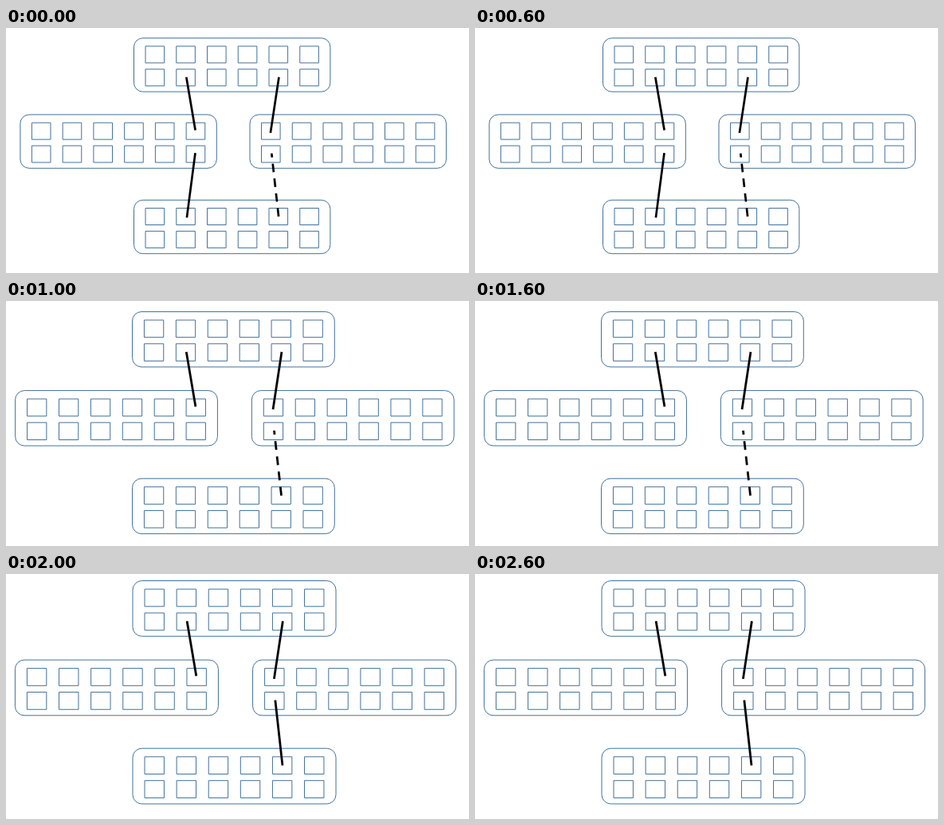
An HTML page with a canvas that plays this animation: 581 by 308 pixels, repeating every 3000 ms.

```html
<!DOCTYPE html>
<html lang="en">
<head>
<meta charset="utf-8">
<title>Linked switches</title>
<style>
html, body { margin: 0; width: 581px; height: 308px; overflow: hidden; background: #fff; }
canvas { display: block; }
</style>
</head>
<body>
<canvas id="stage" width="581" height="308"></canvas>
<script>
const ctx = document.getElementById('stage').getContext('2d');
const STEP = 1000;

// Coordinates are relative to the top panel's corner, at scale 1.
const panels = [[0, 0], [-142.6, 96.2], [145.5, 96.2], [0, 203.6]];
const links = {
  topLeft: [65.8, 49, 77.1, 115.8],
  topRight: [182, 49, 171.4, 119.2],
  bottomLeft: [66.4, 225.6, 77, 144.4],
  bottomRight: [181.6, 224.3, 172.8, 145]
};
const scenes = [
  { x: 160.5, y: 12.7, scale: 1, solid: ['topLeft', 'topRight', 'bottomLeft'], dashed: ['bottomRight'] },
  { x: 158.5, y: 13.5, scale: 1.03, solid: ['topLeft', 'topRight'], dashed: ['bottomRight'] },
  { x: 159, y: 8.5, scale: 1.035, solid: ['topLeft', 'topRight', 'bottomRight'], dashed: [] }
];

function drawPanel([x, y]) {
  ctx.beginPath();
  ctx.roundRect(x, y, 246.4, 67.4, 11.2);
  for (let row = 0; row < 2; row++) {
    for (let col = 0; col < 6; col++) {
      ctx.rect(x + 14.5 + col * 38.75, y + 10.2 + row * 28.9, 23.6, 21);
    }
  }
  ctx.stroke();
}

function drawLink(name, dash) {
  const [x1, y1, x2, y2] = links[name];
  ctx.setLineDash(dash);
  ctx.beginPath();
  ctx.moveTo(x1, y1);
  ctx.lineTo(x2, y2);
  ctx.stroke();
}

function drawScene({ x, y, scale, solid, dashed }) {
  ctx.setTransform(1, 0, 0, 1, 0, 0);
  ctx.fillStyle = '#fff';
  ctx.fillRect(0, 0, 581, 308);
  ctx.setTransform(scale, 0, 0, scale, x, y);
  ctx.setLineDash([]);
  ctx.strokeStyle = '#41719c';
  ctx.lineWidth = 1 / scale;
  panels.forEach(drawPanel);
  ctx.strokeStyle = '#000';
  ctx.lineWidth = 2.7;
  solid.forEach(name => drawLink(name, []));
  dashed.forEach(name => drawLink(name, [10.7, 8]));
}

const start = performance.now();
function tick() {
  const elapsed = Math.max(0, performance.now() - start);
  drawScene(scenes[Math.floor(elapsed / STEP) % scenes.length]);
  requestAnimationFrame(tick);
}
tick();
</script>
</body>
</html>
```
